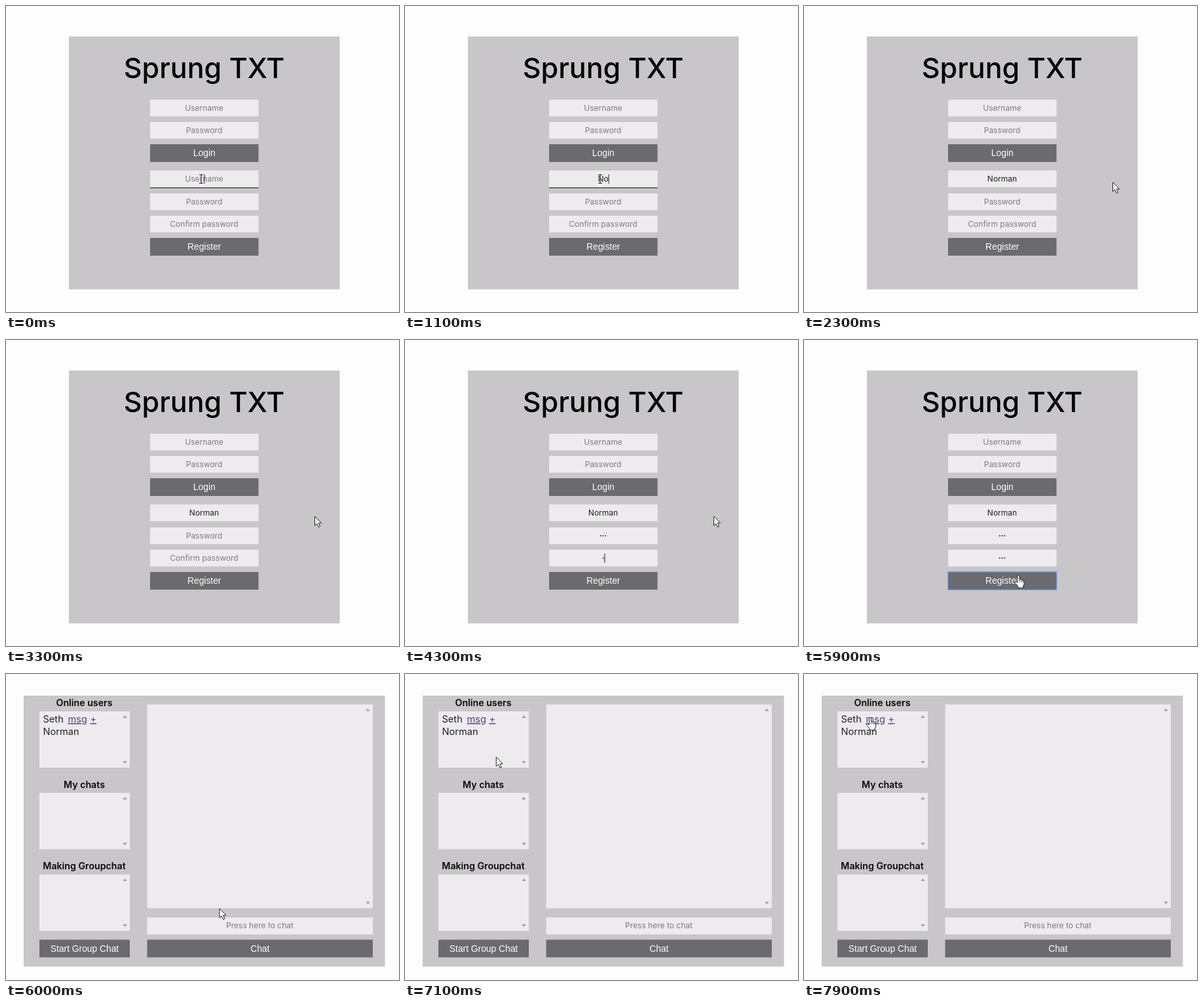
These frames come from a looping animation (600x467 px, 8000 ms). An HTML page:

```html
<!DOCTYPE html>
<html lang="en">
<head>
<meta charset="utf-8">
<title>Chat sign-up</title>
<style>
  html, body { margin: 0; width: 100%; height: 100%; overflow: hidden; background: #fefdfe; }
  svg { display: block; width: 600px; height: 467px; }
  text { font: 12px Inter, sans-serif; text-anchor: middle; fill: #7d7b7e; }
  .panel { fill: #c8c6c8; }
  .box { fill: #edebee; }
  .btn { fill: #6b6a6c; }
  .arrow { fill: #a09ea1; }
  .title { font-size: 43px; font-weight: 500; fill: #000; }
  .label { font: 13.8px "Liberation Sans", Arial, sans-serif; fill: #fff; }
  .head { font-size: 14.2px; font-weight: 600; fill: #080808; }
  .item { font-size: 14.6px; text-anchor: start; fill: #222; }
  .link { fill: #54407c; text-decoration: underline; }
  .typed { fill: #222; }
  #ring { fill: none; stroke: #5c8fdc; stroke-width: 1.3; }
  #line, #caret { fill: #1c1c1c; }
</style>
</head>
<body>
<svg viewBox="0 0 600 467">
  <g id="login">
    <rect class="panel" x="96" y="46.5" width="413.5" height="386"/>
    <text class="title" x="302.5" y="110">Sprung TXT</text>
    <g id="form"></g>
    <g id="typed" class="typed"></g>
    <rect id="ring" x="220" y="354" width="165.5" height="27"/>
    <rect id="line" x="220" width="165.5" height="1"/>
    <rect id="caret" width="1" height="14"/>
  </g>

  <g id="chat">
    <rect class="panel" x="27" y="33" width="551.5" height="413.5"/>
    <g id="lists"></g>
    <text class="item" x="56.5" y="74">Seth</text>
    <text class="item link" x="94.5" y="74">msg</text>
    <text class="item link" x="128.5" y="74">+</text>
    <text class="item" x="56.5" y="93">Norman</text>
    <text x="387.5" y="388.3">Press here to chat</text>
  </g>

  <g id="mouse">
    <path id="arrow" d="M0 0V14.2L3.3 11.2L5.6 16.6L8 15.5L5.7 10.3H10Z"
      fill="#fff" stroke="#222" stroke-linejoin="round"/>
    <g id="beam" fill="none">
      <path d="M-3 -6.5H3M0 -6.5V6.5M-3 6.5H3" stroke="#fff" stroke-width="2.4" opacity=".6"/>
      <path d="M-3 -6.5H3M0 -6.5V6.5M-3 6.5H3" stroke="#222" stroke-width="1.2"/>
    </g>
    <g id="hand" stroke="#222" stroke-linejoin="round">
      <path fill="#fff" d="M0 2.5Q0 1 1.5 1T3 2.5V7.6Q3.6 6.8 4.6 7.1T5.8 8.4Q6.6 7.6 7.4 8T8.3 9.2Q9.8 8.6 10 10.6V14.5Q10 16 8.6 17.6V20.3H.8V18.2L-4 12.4Q-4.6 10.8 -3.2 10.4Q-2.2 10.2 0 12.4Z"/>
      <path fill="none" stroke-width=".8" d="M3 7.6V11.5M5.8 8.4V11.8M8.3 9.2V12"/>
    </g>
  </g>
</svg>
<script>
const LOOP = 8000, STEP = 100, MID = 302.5, DOT_GAP = 3.8;
const SWITCH = 6000, CLICK = 5600;
const $ = id => document.getElementById(id);
const show = (id, on) => $(id).style.display = on ? '' : 'none';

const rect = (x, y, w, h, kind) => `<rect class="${kind}" x="${x}" y="${y}" width="${w}" height="${h}"/>`;
const text = (x, y, s, kind = '') => `<text class="${kind}" x="${x}" y="${y}">${s}</text>`;
const button = (x, y, w, s) => rect(x, y, w, 27, 'btn') + text(x + w / 2, y + 18, s, 'label');
const tri = (x, y, d) => `<path class="arrow" d="M${x - 3.2} ${y + 2 * d}H${x + 3.2}L${x} ${y - 2 * d}Z"/>`;
const scrollBox = (x, y, w, h) =>
  rect(x, y, w, h, 'box') + tri(x + w - 7.5, y + 8, 1) + tri(x + w - 7.5, y + h - 8, -1);

// each group is a column of inputs closed by a button
const group = (top, names) => names.map((label, i) => (
  { label, y: Math.round(top + 34.2 * i), isButton: i === names.length - 1 }));
const rows = [
  ...group(143, ['Username', 'Password', 'Login']),
  ...group(251.4, ['Username', 'Password', 'Confirm password', 'Register'])
];
$('form').innerHTML = rows.map((r, i) => r.isButton
  ? button(220, r.y, 165.5, r.label)
  : rect(220, r.y, 165.5, 25.5, 'box') + `<g id="hint${i}">${text(MID, r.y + 16.8, r.label)}</g>`).join('');

$('lists').innerHTML = ['Online users', 'My chats', 'Making Groupchat'].map((s, i) => {
  const y = 57 + 124.5 * i;
  return text(119.5, y - 8, s, 'head') + scrollBox(51, y, 138, 86);
}).join('') + scrollBox(215.5, 46.5, 344.5, 311) + rect(215.5, 371.5, 344.5, 26, 'box')
  + button(51, 405.5, 138, 'Start Group Chat') + button(215.5, 405.5, 344.5, 'Chat');

const name = 'Norman';
const inputs = [
  { row: 3, focus: 100, start: 800, span: 600, length: name.length },
  { row: 4, focus: 2700, start: 3300, span: 400, length: 3 },
  { row: 5, focus: 4000, start: 4100, span: 400, length: 3 }
];
// the pointer glides along bowed strokes
const home = { x: 298, y: 264 };
const strokes = [
  { start: 2000, end: 2300, x: 471.5, y: 269, bowX: 0, bowY: 85 },
  { start: 4900, end: 5400, x: 326, y: 358, bowX: 90, bowY: 50 },
  { start: 6500, end: 7900, x: 99.5, y: 65.3, bowX: -40, bowY: -40 }
];

const progress = (t, start, span) => Math.min(1, Math.max(0, (t - start) / span));

function pointer(t) {
  let { x, y } = home;
  for (const s of strokes) {
    const p = progress(t, s.start, s.end - s.start), q = p * (2 - p), bow = Math.sin(Math.PI * q);
    x += (s.x - x) * q + s.bowX * bow;
    y += (s.y - y) * q + s.bowY * bow;
    if (p < 1) break;
  }
  return [x, y];
}

// typing speeds up from the first key to the last
const typedCount = (f, t) => Math.ceil(f.length * progress(t, f.start, f.span) ** 2);

function drawForm(t) {
  $('typed').innerHTML = inputs.map((f, i) => {
    const n = typedCount(f, t), y = rows[f.row].y;
    show('hint' + f.row, !n);
    if (!i) return text(MID, y + 16.8, name.slice(0, n), 'typed');
    return Array.from({ length: n }, (_, k) =>
      `<circle cx="${MID + (k - (n - 1) / 2) * DOT_GAP}" cy="${y + 12.7}" r="1"/>`).join('');
  }).join('');

  // the caret blinks from focus, and again from the last key
  const f = inputs.filter(f => t >= f.focus).pop() || inputs[0];
  const since = t - (t > f.start ? f.start + f.span : f.focus);
  const width = f === inputs[0]
    ? $('typed').querySelector('text').getComputedTextLength() : typedCount(f, t) * DOT_GAP;
  show('caret', t < 5500 && (since < 0 || Math.floor(since / 500) % 2 === 0));
  $('caret').setAttribute('x', MID + width / 2);
  $('caret').setAttribute('y', rows[f.row].y + 6);
  show('ring', t >= CLICK);
}

function drawMouse(x, y, form) {
  const row = form && x >= 220 && x <= 385 && rows.find(r => y >= r.y && y <= r.y + 26);
  const list = !form && y > 60 && y < 77;
  const hand = row ? row.isButton : list && x >= 94 && x <= 125;
  const beam = row ? !row.isButton : list && x >= 57 && x <= 90;
  show('hand', hand);
  show('beam', beam);
  show('arrow', !hand && !beam);
  show('line', row && beam);
  if (row) $('line').setAttribute('y', row.y + 26);
  $('mouse').setAttribute('transform', `translate(${x} ${y})`);
}

function frame(now) {
  const t = Math.floor(now % LOOP / STEP) * STEP;
  const form = t < SWITCH;
  show('login', form);
  show('chat', !form);
  if (form) drawForm(t);
  drawMouse(...pointer(t), form);
  requestAnimationFrame(frame);
}
frame(performance.now());
</script>
</body>
</html>
```
